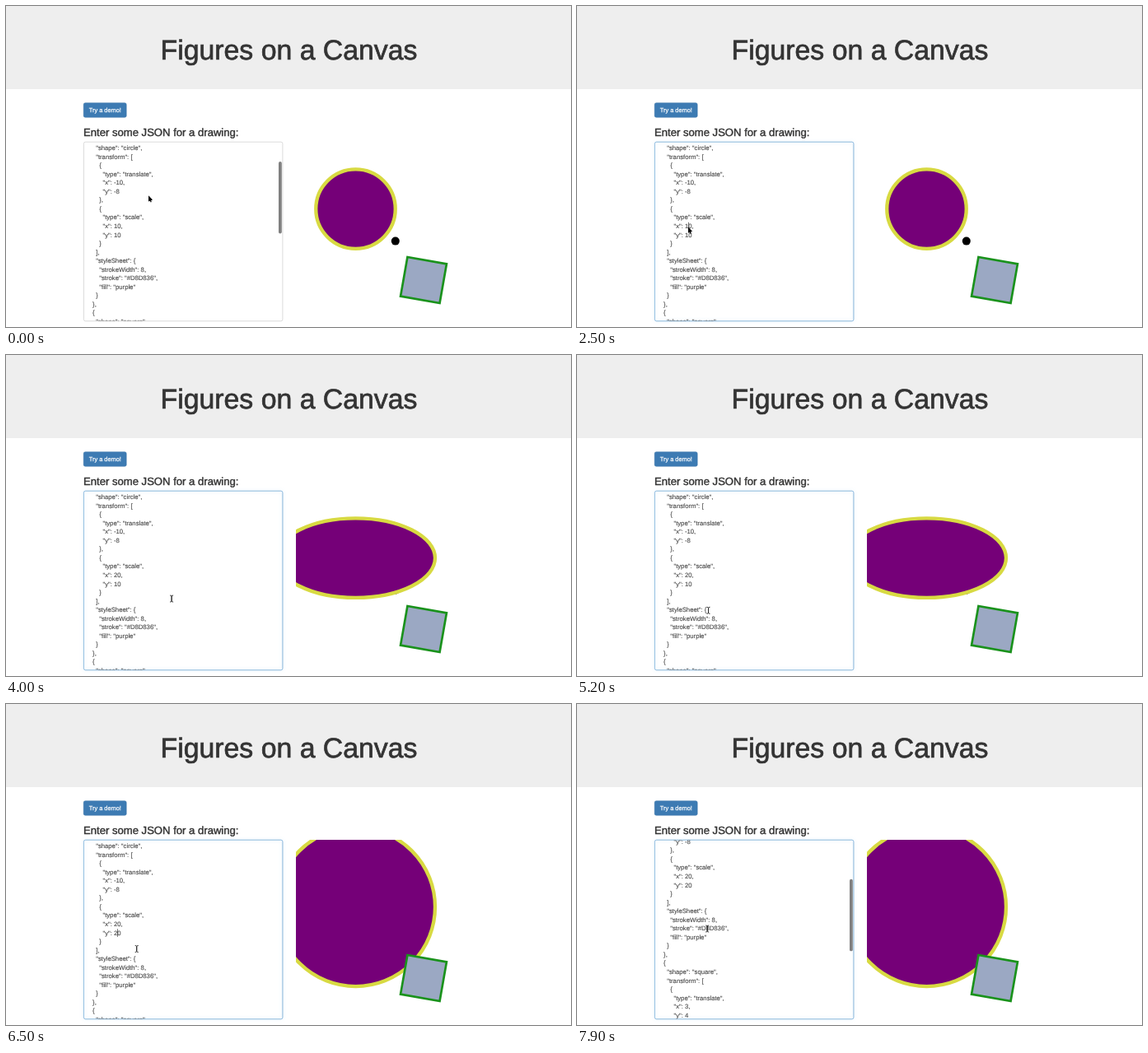
Animation of 686 by 390 pixels, one loop 8000 ms. Source, as an HTML page with a canvas:

```html
<!DOCTYPE html>
<html lang="en">
<head>
<meta charset="utf-8">
<title>Figures on a Canvas</title>
<style>
html, body { margin: 0; width: 100%; height: 100%; overflow: hidden; background: #fff; }
canvas { display: block; }
</style>
</head>
<body>
<canvas id="stage" width="686" height="390"></canvas>
<script>
const ctx = document.getElementById('stage').getContext('2d');
const LOOP = 8000, STEP = 100, BLINK = 500;
const FONT = '"Liberation Sans", Arial, sans-serif';
const LINE = 10.55, TEXT_X = 101, FIRST_BASELINE = 175, CODE_SIZE = 7.7, SPACE = 2.05;
const UNIT = 4.825;

// Moments of the session, in ms
const FOCUS = 2300, RELEASE = 2500, ERASE_X = 3200, TYPE_X = 3500;
const CLICK_Y = 4600, ERASE_Y = 5300, TYPE_Y = 5400, SCROLL = 6600;

const ramp = (t, from, to) => Math.min(1, Math.max(0, (t - from) / (to - from)));
const smooth = k => k * k * (3 - 2 * k);

// Eased move between two points, bowed sideways by an arc
function glide(t, start, end, from, to, bow = { x: 0, y: 0 }) {
  const k = ramp(t, start, end);
  const mix = axis => from[axis] + (to[axis] - from[axis]) * smooth(k) + bow[axis] * Math.sin(Math.PI * k);
  return { x: mix('x'), y: mix('y') };
}

function scaleAt(t, erased, typed) {
  return t < erased ? 10 : t < typed ? 0 : 20;
}

function codeLines(sx, sy) {
  const drawing = [
    {
      shape: 'circle',
      transform: [{ type: 'translate', x: -10, y: -8 }, { type: 'scale', x: sx, y: sy }],
      styleSheet: { strokeWidth: 8, stroke: '#D8D836', fill: 'purple' }
    },
    { shape: 'square', transform: [{ type: 'translate', x: 3, y: 4 }] }
  ];
  return JSON.stringify(drawing, null, 2).split('\n').slice(2);
}

function label(text, x, y, size, color, weight) {
  ctx.font = `${size}px ${FONT}`;
  ctx.fillStyle = ctx.strokeStyle = color;
  ctx.lineWidth = weight;
  ctx.fillText(text, x, y);
  ctx.strokeText(text, x, y);
}

function paint(fill, stroke, width) {
  ctx.fillStyle = fill;
  ctx.fill();
  ctx.strokeStyle = stroke;
  ctx.lineWidth = width;
  ctx.stroke();
}

function roundBox(x, y, w, h, r) {
  ctx.beginPath();
  ctx.roundRect(x, y, w, h, r);
}

function clipTo(x, y, w, h) {
  ctx.beginPath();
  ctx.rect(x, y, w, h);
  ctx.clip();
}

function drawPage() {
  ctx.fillStyle = '#fff';
  ctx.fillRect(0, 0, 686, 390);
  ctx.fillStyle = '#eee';
  ctx.fillRect(0, 0, 686, 101);
  ctx.textAlign = 'center';
  label('Figures on a Canvas', 343.5, 65.4, 33.8, '#333', 0.7);
  ctx.textAlign = 'left';

  roundBox(94.2, 117.7, 52, 17.6, 2.1);
  paint('#3d7bb3', '#3872a6', 0.5);
  label('Try a demo!', 100.7, 129.2, 7.4, '#fff', 0.25);
  label('Enter some JSON for a drawing:', 94, 157.6, 13.1, '#333', 0.4);
}

function drawShapes(sx, sy) {
  ctx.save();
  clipTo(352, 165, 334, 225);

  ctx.fillStyle = '#000';
  ctx.beginPath();
  ctx.arc(472.8, 285.6, 5, 0, 7);
  ctx.fill();

  if (sx && sy) {
    ctx.beginPath();
    ctx.ellipse(424.5, 246.6, sx * UNIT, sy * UNIT, 0, 0, 7);
    paint('#750078', '#d8da42', 4.3);
  }

  ctx.translate(507, 333);
  ctx.rotate(Math.PI / 18);
  ctx.beginPath();
  ctx.rect(-UNIT * 5, -UNIT * 5, UNIT * 10, UNIT * 10);
  paint('#9ba8c3', '#1a921c', 2.7);
  ctx.restore();
}

function drawFrame(focus) {
  roundBox(94.4, 165.2, 241.5, 217.6, 2.1);
  ctx.lineWidth = 0.7;
  ctx.strokeStyle = '#ccc';
  ctx.stroke();
  ctx.save();
  ctx.globalAlpha = focus;
  ctx.shadowColor = 'rgba(102,175,233,.4)';
  ctx.shadowBlur = 4;
  ctx.strokeStyle = '#7ab8ea';
  ctx.stroke();
  ctx.restore();
}

function caretLit(t) {
  if (t < FOCUS) return false;
  const actions = [FOCUS, RELEASE, ERASE_X, TYPE_X, CLICK_Y, ERASE_Y, TYPE_Y];
  const last = Math.max(...actions.filter(a => a <= t));
  return Math.floor((t - last) / BLINK) % 2 === 0;
}

function drawCaret(t, lines, scroll) {
  if (!caretLit(t)) return;
  const firstRow = lines.findIndex(line => line.includes('scale')) + 1;
  const row = t < CLICK_Y ? firstRow : firstRow + 1;
  const [key, value] = lines[row].trimStart().split(': ');
  const typed = value.startsWith('0') ? '' : value[0];
  ctx.font = `${CODE_SIZE}px ${FONT}`;
  const x = TEXT_X + 8 * SPACE + ctx.measureText(`${key}: ${typed}`).width;
  ctx.fillStyle = '#333';
  ctx.fillRect(x - 0.1, FIRST_BASELINE + row * LINE - scroll - 7.2, 0.7, 9.6);
}

function drawEditor(t, sx, sy) {
  const scroll = 58 * smooth(ramp(t, SCROLL, SCROLL + 500));
  const lines = codeLines(sx, sy);
  ctx.save();
  clipTo(94.8, 165.6, 240.8, 216.9);
  lines.forEach((line, i) => {
    const text = line.trimStart();
    const indent = line.length - text.length;
    label(text, TEXT_X + indent * SPACE, FIRST_BASELINE + i * LINE - scroll, CODE_SIZE, '#484848', 0.12);
  });
  drawCaret(t, lines, scroll);

  ctx.globalAlpha = t > SCROLL ? 1 : 1 - ramp(t, 200, 500);
  ctx.fillStyle = '#808080';
  roundBox(331, 189 + scroll * 0.41, 3.8, 87.5, 1.9);
  ctx.fill();
  ctx.restore();
}

function drawArrow({ x, y }) {
  ctx.save();
  ctx.translate(x, y);
  ctx.fillStyle = ctx.strokeStyle = '#000';
  ctx.lineWidth = 1.3;
  ctx.beginPath();
  ctx.moveTo(0, 0);
  ctx.lineTo(0, 7.2);
  ctx.lineTo(5, 5.3);
  ctx.fill();
  ctx.beginPath();
  ctx.moveTo(1.8, 4.5);
  ctx.lineTo(3.2, 8);
  ctx.stroke();
  ctx.restore();
}

function drawBeam({ x, y }) {
  ctx.beginPath();
  for (const side of [-1, 1]) {
    ctx.moveTo(x + 2 * side, y - 4);
    ctx.quadraticCurveTo(x, y - 4, x, y - 3);
    ctx.lineTo(x, y + 3);
    ctx.quadraticCurveTo(x, y + 4, x + 2 * side, y + 4);
  }
  ctx.strokeStyle = '#222';
  ctx.lineWidth = 0.9;
  ctx.stroke();
}

function drawPointer(t) {
  const start = { x: 173, y: 230.3 }, hover = { x: 144, y: 244.3 }, xField = { x: 135, y: 268.5 };
  const yField = { x: 137, y: 277 }, style = { x: 159.5, y: 310.3 };
  const fill = { x: 158.7, y: 297.5 }, stroke = { x: 158.2, y: 273 };

  if (t < 1100) drawArrow(glide(t, 0, 1000, start, hover, { x: -22, y: 0 }));
  else if (t < ERASE_X) drawArrow(glide(t, 1100, 1900, hover, xField, { x: 0, y: -40 }));
  else if (t < 3800) return;
  else if (t < CLICK_Y) drawBeam(glide(t, 3700, CLICK_Y, yField, yField, { x: 74, y: 22 }));
  else if (t < ERASE_Y) drawBeam(glide(t, CLICK_Y, 4800, yField, style));
  else if (t < 6300) return;
  else if (t < 7300) drawBeam(glide(t, 6200, 6500, style, fill));
  else drawBeam(glide(t, 7300, 7900, fill, stroke, { x: 12, y: 62 }));
}

function render(now) {
  const t = Math.floor((now % LOOP) / STEP) * STEP;
  const sx = scaleAt(t, ERASE_X, TYPE_X);
  const sy = scaleAt(t, ERASE_Y, TYPE_Y);
  ctx.textRendering = 'geometricPrecision';
  drawPage();
  drawShapes(sx, sy);
  drawFrame(ramp(t, FOCUS - STEP, FOCUS + STEP));
  drawEditor(t, sx, sy);
  drawPointer(t);
}

const began = performance.now();
function tick() {
  render(performance.now() - began);
  requestAnimationFrame(tick);
}
tick();
</script>
</body>
</html>
```
